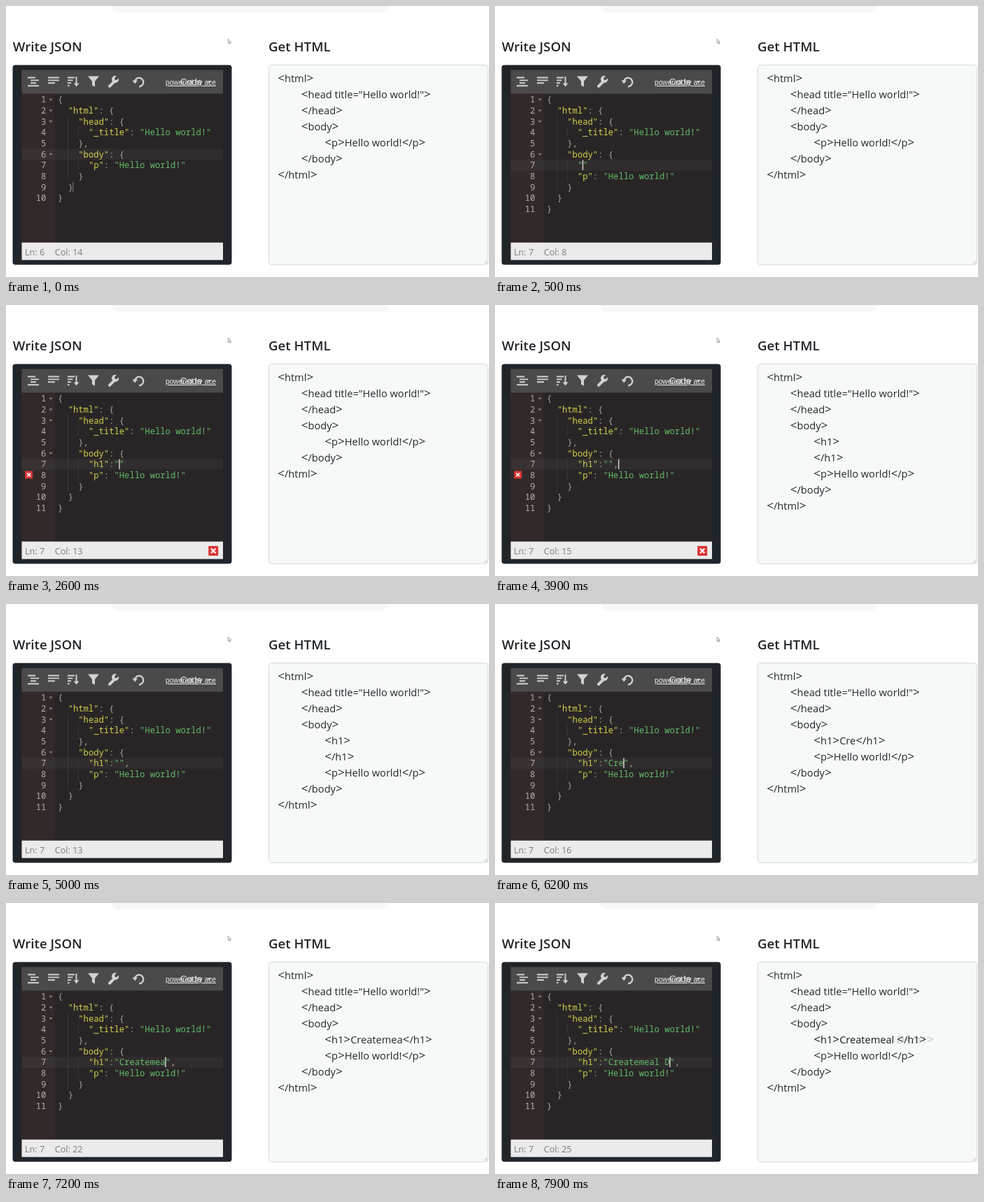
Animation, 690 px wide and 388 px high, one loop 8000 ms. Source, as an HTML page:

```html
<!DOCTYPE html>
<html lang="en">
<head>
<meta charset="utf-8">
<title>JSON to HTML</title>
<style>
  html, body { margin: 0; width: 100%; height: 100%; overflow: hidden; background: #fff; }
  svg { display: block; width: 100vw; height: 100vh; }
  text { white-space: pre; }
  .ui { font-family: "Open Sans", "Noto Sans", sans-serif; }
  .title { font-size: 18.7px; font-weight: 600; fill: #212529; }
  .out { font-size: 14.6px; fill: #24292d; }
  .angle { font-size: 17.2px; }
  .status { font-size: 12.6px; fill: #7b7b7b; }
  .code { font-family: "Noto Sans Mono", "DejaVu Sans Mono", monospace; font-size: 12.2px; fill: #aaa69f; }
  .num { fill: #b5b0ac; text-anchor: end; }
  .key { fill: #d0d14c; }
  .str { fill: #61bd68; }
  .bar { font-family: "Liberation Sans", Arial, sans-serif; fill: #f0f0f0; }
</style>
</head>
<body>
<svg viewBox="0 0 690 388">
  <defs>
    <filter id="soft" x="-5%" y="-50%" width="110%" height="250%"><feGaussianBlur stdDeviation="2"/></filter>
    <g id="error">
      <rect x="-7" y="-7" width="14" height="14" rx="1" fill="#dc3535"/>
      <path d="M-3.2-3.2 3.2 3.2M3.2-3.2-3.2 3.2" stroke="#fff" stroke-width="2.2"/>
    </g>
  </defs>
  <rect width="690" height="388" fill="#fff"/>
  <rect x="153" y="-14" width="391" height="21.5" rx="7" fill="#eee" filter="url(#soft)"/>
  <rect x="153" y="-14" width="391" height="20" rx="7" fill="#f8f8f8"/>
  <path d="M317.3 47.3v6l1.4-1.2 1 2.2 1-.5-1-2.1h1.8z" fill="#fff" stroke="#777" stroke-width=".7"/>
  <text class="ui title" x="9.8" y="65.3">Write JSON</text>
  <text class="ui title" x="375" y="65.3">Get HTML</text>

  <rect x="9.5" y="84.5" width="313" height="286" rx="4" fill="#20252a"/>
  <rect x="22.5" y="91.7" width="287.5" height="272" fill="#292526"/>
  <rect x="22.5" y="125" width="47" height="214" fill="#322a2a"/>
  <rect x="22.5" y="91.7" width="287.5" height="33.8" fill="#4a4a4a"/>
  <g fill="none" stroke="#d2d2d2" stroke-width="1.9">
    <path d="M31 102.5h11M35 106.4h12M35 110.3h8M31 114.2h16"/>
    <path d="M60 102.5h16M60 106.4h16M60 110.3h10"/>
    <path d="M88 102.5h10M88 106.4h7.5M88 110.3h5M88 114.2h2.5"/>
    <path d="M100.5 101v11"/>
    <path d="M184 108a6.2 6.2 0 1 1 6 7.3" stroke-width="2.3"/>
    <path d="M148 114.8l6.5-6.5" stroke-width="4" stroke-linecap="round"/>
  </g>
  <g fill="#d2d2d2">
    <path d="M96.8 110.5h7.6l-3.8 5z"/>
    <path d="M117 100.5h16l-6 7.2v8l-4-2.2v-5.8z"/>
    <path d="M157.8 100.2l-2.6 3 .5 2.5 2.5.4 2.7-2.7a5 5 0 0 1-6.7 6.2 5 5 0 0 1 3.6-9.4z"/>
    <path d="M180.5 106.5h7.5l-3.8 5z"/>
  </g>
  <text class="bar" x="228" y="113" font-size="10.2" text-decoration="underline">powered by ace</text>
  <text class="bar" x="249" y="113.3" font-size="13">Code</text>
  <path d="M288 107.4h5l-2.5 2.9z" fill="#eee"/>

  <g id="editor" class="code"></g>
  <rect id="caret" width="1.4" height="14.5" fill="#ddd"/>
  <rect x="22.5" y="338.7" width="287.5" height="25" fill="#ebebeb"/>
  <text class="ui status" id="ln" x="27" y="357.3"></text>
  <text class="ui status" id="col" x="69.8" y="357.3"></text>
  <g id="errors">
    <use href="#error" transform="translate(32.7 243) scale(.78)"/>
    <use href="#error" transform="translate(296.2 352)"/>
  </g>

  <rect x="375.5" y="84.5" width="313" height="286" rx="4" fill="#f7f9f9" stroke="#d5dadd"/>
  <path d="M683 369l4-4M686 369l1.5-1.5" stroke="#999" stroke-width=".7"/>
  <g id="output" class="ui out"></g>
</svg>
<script>
const LOOP = 8000, ADV = 7.32, LEFT = 74, PITCH = 15.65;
const $ = id => document.getElementById(id);
const rowY = n => 134 + (n - 1) * PITCH;

// [time, new line in the editor, caret column, h1 content]
const steps = [
  [0, null, 14, null], [100, '', 7, null], [400, '""', 8, null],
  [1200, '"h"', 9, null], [1400, '"h1"', 10, null], [1600, '"h1"', 11, null],
  [2000, '"h1":', 12, null], [2400, '"h1":""', 13, null], [3100, '"h1":""', 14, null],
  [3700, '"h1":"",', 15, ''], [4300, '"h1":"",', 14, ''], [4400, '"h1":"",', 13, '']
];
const word = 'Createmeal D';
const keyTimes = [5800, 6000, 6100, 6300, 6500, 6600, 6800, 6900, 7200, 7300, 7600, 7800];
keyTimes.forEach((t, i) => {
  const typed = word.slice(0, i + 1);
  steps.push([t, `"h1":"${typed}",`, 14 + i, typed.replace('D', '')]);
});

const markup = s => s.replace(/[<>]/g, c =>
  `<tspan class="angle">${c === '<' ? '&lt;' : '&gt;'}</tspan>`);
const paint = s => s.replace(/"[^"]*"(:?)/g, (m, colon) =>
  `<tspan class="${colon ? 'key' : 'str'}">${colon ? m.slice(0, -1) : m}</tspan>${colon}`);

function drawEditor(added) {
  const lines = ['{', '  "html": {', '    "head": {', '      "_title": "Hello world!"', '    },',
    '    "body": {', '      "p": "Hello world!"', '    }', '  }', '}'];
  if (added !== null) lines.splice(6, 0, '      ' + added);
  const active = added === null ? 6 : 7, top = rowY(active) - PITCH / 2;
  let out = `<rect x="22.5" y="${top}" width="287.5" height="${PITCH}" fill="#fff" opacity=".035"/>`;
  lines.forEach((line, i) => {
    const y = rowY(i + 1), indent = line.search(/\S/);
    for (let c = 2; c < indent; c += 2)
      out += `<path d="M${LEFT + c * ADV} ${y - PITCH / 2}v${PITCH}" stroke="#555050" stroke-width=".8" stroke-dasharray="1 1"/>`;
    out += `<text class="num" x="57.3" y="${y + 4.4}">${i + 1}</text>`;
    if (line.endsWith('{') && i < 6)
      out += `<path d="M61.5 ${y - 1.2}h5l-2.5 3z" fill="#8c8583"/>`;
    out += `<text x="${LEFT + Math.max(indent, 0) * ADV}" y="${y + 4.4}">${paint(line.trim())}</text>`;
  });
  if (added === null)
    out += `<rect x="95.2" y="${rowY(9) - 7}" width="1.2" height="14" fill="#77716f"/>`;
  $('editor').innerHTML = out;
}

function drawOutput(h1, ghost) {
  const rows = [[0, '<html>'], [1, '<head title="Hello world!">'], [1, '</head>'], [1, '<body>']];
  if (h1 === '') rows.push([2, '<h1>'], [2, '</h1>']);
  else if (h1) rows.push([2, `<h1>${h1}</h1>`]);
  rows.push([2, '<p>Hello world!</p>'], [1, '</body>'], [0, '</html>']);
  const put = (tab, s, i, extra = '') =>
    `<text x="${388.2 + tab * 33.5}" y="${109.3 + i * 22.9}"${extra}>${markup(s)}</text>`;
  $('output').innerHTML = rows.map(([tab, s], i) => put(tab, s, i)).join('') +
    (ghost ? put(2, `<h1>${word}</h1>`, 4, ' opacity=".25"') : '');
}

let last = '';
function render(t) {
  const at = steps.findLastIndex(s => s[0] <= t);
  const [, added, col, h1] = steps[at];
  const ghost = t >= 7900, row = added === null ? 6 : 7;
  if (last !== at + '/' + ghost) {
    last = at + '/' + ghost;
    drawEditor(added);
    drawOutput(h1, ghost);
    $('ln').textContent = 'Ln: ' + row;
    $('col').textContent = 'Col: ' + col;
    $('caret').setAttribute('x', LEFT + (col - 1) * ADV - 0.5);
    $('caret').setAttribute('y', rowY(row) - 7.3);
  }
  const hidden = t < 100 || (t >= 5000 && t < 5400);
  $('caret').setAttribute('opacity', hidden ? 0 : 1);
  $('errors').setAttribute('opacity', t >= 700 && t < 4000 ? 1 : 0);
}

const start = performance.now();
function tick() {
  render((performance.now() - start) % LOOP);
  requestAnimationFrame(tick);
}
tick();
</script>
</body>
</html>
```
